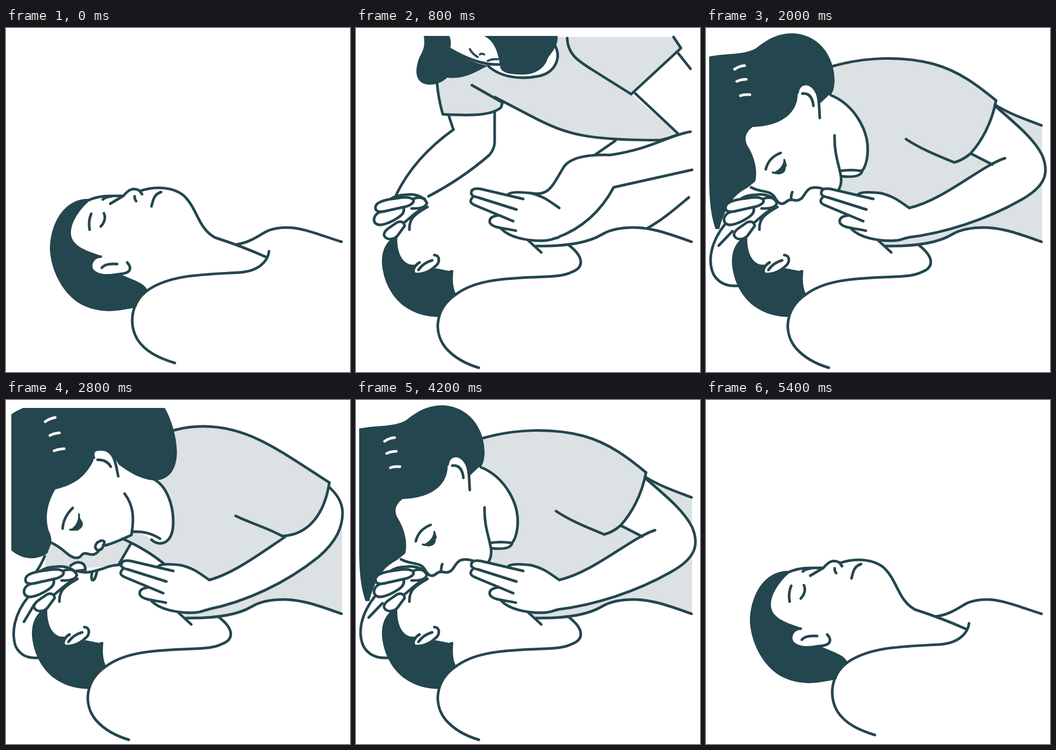
Animation, 650 px wide and 650 px high, one loop 7.2 s. Source, as an HTML page without scripts:

```html
<!DOCTYPE html>
<html lang="en">
<head>
<meta charset="utf-8">
<title>Rescue breathing</title>
<style>
html, body { margin: 0; width: 100%; height: 100%; overflow: hidden; background: #fff; }
svg { display: block; width: 100%; height: 100%; }
.line { fill: none; stroke: #24464e; stroke-width: 5; stroke-linecap: round; stroke-linejoin: round; }
.ink { fill: #24464e; stroke: none; }
.grey { fill: #dce1e3; stroke: none; }
.skin { fill: #fff; stroke: none; }
.body { fill: #fff; }
.shine { stroke: #fff; }

/* each layer is switched on and off at fixed moments of the loop */
.show { opacity: 0; animation: 7.2s step-end infinite; }
.flat { animation-name: flat; }
.approach { animation-name: approach; }
.trunk { animation-name: trunk; }
.lean { animation-name: lean; }
.reach { animation-name: reach; }
.touch { animation-name: touch; }
.pinch { animation-name: pinch; }
.settle { animation-name: settle; }
.tilted { animation-name: tilted; }
.hold { animation-name: hold; }
.watch { animation-name: watch; }
.blow { animation-name: blow; }
.open { animation-name: open; }
.closed { animation-name: closed; }
@keyframes flat { 0%, 72.222% { opacity: 1 } 8.333% { opacity: 0 } 100% { opacity: 1 } }
@keyframes approach { 0%, 5.555% { opacity: 0 } 2.777% { opacity: 1 } }
@keyframes trunk { 0%, 13.888%, 75% { opacity: 0 } 2.777%, 72.222% { opacity: 1 } }
@keyframes lean { 0%, 13.888%, 75% { opacity: 0 } 5.555%, 72.222% { opacity: 1 } }
@keyframes reach { 0%, 8.333%, 75% { opacity: 0 } 5.555%, 72.222% { opacity: 1 } }
@keyframes touch { 0%, 11.111% { opacity: 0 } 8.333% { opacity: 1 } }
@keyframes pinch { 0%, 13.888% { opacity: 0 } 11.111% { opacity: 1 } }
@keyframes settle { 0%, 13.888% { opacity: 0 } 8.333% { opacity: 1 } }
@keyframes tilted { 0%, 72.222% { opacity: 0 } 8.333% { opacity: 1 } }
@keyframes hold { 0%, 72.222% { opacity: 0 } 11.111% { opacity: 1 } }
@keyframes watch { 0%, 22.222%, 52.777%, 72.222% { opacity: 0 } 13.888%, 38.888%, 69.444% { opacity: 1 } }
@keyframes blow { 0%, 13.888%, 38.888%, 69.444% { opacity: 0 } 22.222%, 52.777% { opacity: 1 } }
@keyframes open { 0%, 27.777%, 58.333% { opacity: 0 } 22.222%, 52.777% { opacity: 1 } }
@keyframes closed { 0%, 38.888%, 69.444% { opacity: 0 } 27.777%, 58.333% { opacity: 1 } }
</style>
</head>
<body>
<svg viewBox="0 0 650 650" class="line">
<defs>
  <g id="palm">
    <path d="M147 254L118 233C108 220 122 212 130 217C140 224 143 233 153 240C172 245 186 258 186 275Q186 290 178 300M187 280L194 292M137 258L97 262C77 265 76 282 92 283L112 278Q118 272 108 271M137 256Q140 266 148 275M90 283C70 288 72 306 86 307Q94 295 110 296M77 299C66 308 68 320 82 320L103 318M72 319C58 320 56 337 70 338L95 336L116 345M135 306Q150 312 165 305"/>
  </g>
</defs>

<!-- leaning helper -->
<g class="show trunk">
  <path class="grey" d="M250 72L382 17H601L614 38L520 125L609 201L575 212C440 214 400 203 330 166L219 108Z"/>
  <path d="M219 108L330 166C400 203 440 212 575 212Q592 208 609 201M399 19C400 50 420 62 445 78L520 125L614 38L600 17M609 48L632 77M528 124L609 200"/>
  <path d="M629 320C605 340 580 362 551 378"/>
</g>
<path class="show approach" d="M219 108L382 19"/>
<g class="show lean">
  <path class="grey" d="M153 104L172 95L250 70L262 130L277 141Q275 152 268 157C235 167 200 164 164 163Z"/>
  <path d="M153 104Q156 135 164 163C200 165 255 168 274 150L277 141L219 108"/>
  <path class="skin" d="M176 15H382L376 33C388 55 378 84 345 91C315 97 275 95 250 72L178 42Z"/>
  <path class="ink" d="M128 15H176Q181 22 178 40C200 55 225 68 250 71C222 85 205 97 172 94C160 106 140 110 128 105C110 98 112 75 120 55C130 38 130 30 128 15Z"/>
  <path class="ink" d="M242 15H381C382 35 370 45 362 58C357 75 340 88 315 88C290 88 272 85 272 70C268 45 262 25 242 15Z"/>
  <path d="M178 40C215 62 245 70 272 69M250 72C275 95 315 97 345 91C378 84 388 55 376 33"/>
  <path stroke-width="4" d="M215 40Q220 49 230 55M234 50Q238 47 242 50M249 62Q258 58 268 59"/>
  <path d="M175 165L184 192"/>
</g>
<g class="show reach">
  <path d="M187 191Q168 212 153 238M210 195Q228 195 243 206M262 160V215Q262 228 252 240Q224 276 192 318"/>
  <path d="M222 317C250 265 320 225 368 189"/>
  <use href="#palm"/>
</g>
<g class="show touch">
  <path d="M187 191Q150 220 118 258M262 160V215Q262 228 252 240Q215 270 155 300"/>
  <use href="#palm" x="-38" y="30"/>
</g>
<path class="show pinch" d="M184 192Q110 245 76 315M262 160V215Q262 228 252 240Q200 285 137 318"/>

<!-- patient lying flat -->
<g class="show flat">
  <path class="skin" d="M157 325C185 314 205 318 222 317C232 305 240 301 253 308C285 297 318 302 335 316C362 340 362 378 395 396L492 433L440 462L267 496L120 460V360Z"/>
  <path class="ink" d="M160 323C110 320 83 370 83 420C86 460 105 490 120 505C140 527 170 535 197 535C215 534 230 531 246 528C250 515 258 505 268 497C262 482 245 478 220 467L200 467C175 470 160 460 161 450C161 440 170 432 181 431C160 423 138 418 127 402C112 378 140 340 160 325Z"/>
  <path d="M157 325C180 315 200 318 222 317M197 332L222 317C232 305 240 301 252 307L257 314M183 324Q188 319 200 318M253 308C285 297 318 302 335 316C362 340 362 378 395 396Q445 412 492 433M434 409C462 406 480 390 495 383C508 378 520 377 530 377C562 377 595 392 634 404"/>
  <path d="M497 422C495 440 478 460 440 462C370 466 310 466 267 496C235 520 232 560 248 588C263 612 290 624 319 633"/>
  <path d="M243 318Q243 324 246 327M293 310C280 314 278 324 275 337M161 351Q155 365 158 381M185 350C189 358 186 368 179 375"/>
  <path class="body" d="M179 432C165 432 160 444 161 452C163 464 180 469 200 467L222 464C237 461 237 452 229 443"/>
  <path d="M181 453Q188 444 210 446"/>
</g>

<!-- hand at the chin -->
<g class="show reach">
  <path class="skin" d="M365 293L393 256L480 240L489 293L462 333Q440 355 400 354L340 346L335 335L345 310Z"/>
  <path d="M451 240L490 213M632 196C590 203 560 228 480 240C440 244 410 238 393 256Q372 275 365 293M635 268L487 301"/>
  <path d="M417 266C395 288 375 295 362 299C350 302 341 312 341 322M428 292C400 310 380 318 360 320Q340 326 335 342Q345 350 365 344C400 340 415 328 437 313M443 330C425 345 400 350 372 346M384 350C410 362 440 355 462 333Q480 312 489 293"/>
</g>

<!-- helper watching the chest -->
<g class="show watch">
  <path class="grey" d="M318 57C375 42 430 52 480 76C525 98 570 130 611 156L635 215V404C555 378 510 367 465 390C440 407 400 413 340 412L298 309L235 273L214 312L75 325L73 293L85 268L220 250L280 150Z"/>
  <path class="skin" d="M280 150C302 162 316 195 316 230C316 262 303 271 290 271Q281 270 275 264Q258 250 238 249L224 177Z"/>
  <path class="skin" d="M93 169L165 100L205 95L290 152L238 249L237 255C218 264 200 272 186 275L178 284C170 292 165 294 152 290C140 288 145 300 130 298C115 295 110 280 84 269L78 230Z"/>
  <path class="skin" d="M220 262Q265 282 298 309L220 310L235 273Z"/>
  <path class="ink" d="M10 27Q20 20 32 15H300C312 35 323 70 323 100C322 135 305 152 280 152C255 150 235 138 213 122C205 110 200 98 190 94Q175 90 166 98L165 115C150 145 130 160 93 169C75 200 75 225 80 245Q88 262 85 272L78 290C50 307 25 297 10 284Z"/>
  <path class="body" d="M166 109C160 93 174 92 187 94C206 101 207 120 212 144"/>
  <path d="M173 113Q190 112 198 126M224 177C242 200 242 225 237 255C218 264 200 272 186 275M84 269C110 280 115 295 130 298C145 300 140 288 152 290C165 294 170 292 176 284M184 274C190 265 180 263 172 270Q165 278 173 284Q182 284 184 274"/>
  <path d="M238 249C260 248 275 252 291 262M280 150C302 162 316 195 316 230C316 262 303 271 290 271Q281 270 275 264M126 204Q108 222 107 243"/>
  <path class="ink" d="M137 215Q140 225 145 231C147 242 138 249 119 246Q137 237 137 215Z"/>
  <path stroke-width="3.5" d="M138 216V230M121 245H136"/>
  <path class="shine" d="M74 41Q82 35 93 33M83 67Q90 63 101 62M91 96Q98 93 110 92"/>
  <path d="M318 57C375 42 430 52 480 76C525 98 570 130 611 156M220 262Q265 282 298 309M235 273L214 309M73 295Q66 312 58 323"/>
</g>

<!-- helper giving a breath -->
<g class="show blow">
  <path class="grey" d="M240 72C300 55 370 52 430 68C480 82 515 110 548 137L546 145C575 163 605 173 635 184V404C555 378 510 367 465 390C440 407 400 413 340 412L240 310Z"/>
  <path class="skin" d="M236 127C280 145 310 195 305 240Q303 260 295 270Q293 284 255 278L200 180Z"/>
  <path d="M236 127C280 145 310 195 305 240Q303 260 295 270Q293 284 255 280M253 270Q275 267 293 270"/>
  <g class="body">
    <path class="skin" d="M88 187L173 120L213 125L243 203L254 275L251 305L222 303L197 305L165 325L145 334L85 301L74 215Z"/>
    <path class="show closed" d="M243 203C242 235 250 255 254 275Q258 292 251 305L222 303V203" stroke="none"/>
    <path class="show closed" fill="none" d="M243 203C242 235 250 255 254 275Q258 292 251 305"/>
    <path class="show open" d="M243 203C257 220 263 250 264 270Q264 292 251 305L222 303V203" stroke="none"/>
    <path class="show open" fill="none" d="M243 203C257 220 263 250 264 270Q264 292 251 305"/>
  </g>
  <path class="ink" d="M6 54C40 47 70 52 95 38C115 22 135 10 163 10C215 12 243 55 243 100C242 118 238 128 232 127L213 145C212 125 205 108 190 106Q172 108 173 122C175 150 155 185 88 187C75 197 70 210 80 225C92 245 98 270 93 290L78 302C60 312 40 325 25 380H18C8 350 6 320 6 280Z"/>
  <path class="body" d="M173 122C175 105 190 102 200 110C215 122 213 140 215 170"/>
  <path d="M182 124Q200 122 203 147M141 236Q118 245 113 267"/>
  <path class="ink" d="M147 248Q150 257 151 261C151 276 142 279 124 274Q145 267 147 248Z"/>
  <path stroke-width="3.5" d="M148 249L151 260M126 273L138 275"/>
  <path class="shine" d="M54 78Q62 72 73 71M58 101Q66 97 76 97M65 128Q72 125 83 126"/>
  <path d="M240 72C300 55 370 52 430 68C480 82 515 110 548 137M546 145C575 163 605 173 634 184"/>
</g>

<!-- patient with head tilted back -->
<g class="show tilted">
  <path class="skin" d="M78 400C80 370 100 350 135 333C150 338 160 325 165 326C185 325 200 313 222 312L325 401L340 412C400 413 440 405 465 390C480 381 500 377 525 377C560 377 595 390 634 404L640 412L403 470L188 504Z"/>
  <path class="ink" d="M65 400Q48 415 49 445C52 480 68 508 90 525C112 541 135 546 158 546C160 530 172 515 189 503C183 490 182 478 184 458Q180 456 176 459C165 457 158 455 150 454C130 466 115 467 108 460L111 447C92 450 77 430 78 397Z"/>
  <path class="body" d="M148 429C160 430 158 444 150 450C140 460 128 465 113 465C104 462 110 449 120 443"/>
  <path d="M118 457Q128 443 144 439M403 411C430 432 432 452 408 461C390 470 370 469 330 471C270 474 222 478 188 504C150 530 145 575 170 605Q192 630 232 642M325 401L350 424M101 381C100 362 108 353 135 338"/>
  <path d="M340 412C400 413 440 405 465 390C480 381 500 377 525 377C560 377 595 390 634 404"/>
</g>
<g class="show watch">
  <path class="body" d="M122 313C135 302 150 306 150 321L134 323"/>
  <path d="M134 323C152 330 170 322 185 318Q205 310 222 312M163 325C158 346 168 346 172 323"/>
  <path d="M42 372C15 405 10 440 18 465Q30 490 62 487M53 387L34 419"/>
</g>
<g class="show blow">
  <path class="skin" d="M85 301C105 312 120 305 130 320C138 335 145 334 152 328L165 325L160 300Z"/>
  <path d="M85 301C105 312 120 305 130 320C138 335 145 334 152 328Q158 323 165 325C185 330 184 309 197 303Q207 299 222 304M163 310Q160 318 161 325M60 300L45 322"/>
  <path d="M38 368C8 405 3 440 14 465Q28 490 62 487M50 384L24 411"/>
</g>

<!-- pinching hand -->
<g class="show hold body">
  <path d="M62 325Q76 315 95 315C115 312 130 321 134 331Q130 342 105 341"/>
  <path d="M62 378Q52 385 53 392C58 402 72 400 78 393L92 374Q90 363 78 367Z"/>
  <path d="M62 343L45 348C30 354 30 373 47 372Q62 370 80 358Q93 350 90 339Q84 333 62 343Z"/>
  <path d="M75 322Q40 326 37 337C35 348 45 349 60 345L96 337Q112 331 108 324Q100 317 75 322Z"/>
  <path fill="none" d="M92 367C104 358 115 345 131 338M108 323Q118 318 130 323"/>
</g>

<!-- chin hand with its forearm -->
<g class="show settle">
  <path class="skin" d="M330 312C365 318 370 300 393 262Q410 240 480 240L632 196L635 268L487 301Q450 370 380 396Z"/>
  <path d="M330 312C365 318 370 300 393 262Q410 238 480 240C560 228 590 203 632 196M451 240L490 213M635 268L487 301Q450 370 380 396"/>
</g>
<g class="show watch">
  <path class="skin" d="M384 340C430 328 480 290 527 259C575 253 602 215 611 160C625 178 635 192 636 212C636 240 625 267 590 297C530 345 455 381 380 396Z"/>
  <path d="M384 340C430 328 480 290 527 259M434 219C465 234 490 240 522 257C572 255 602 215 611 156M380 396C455 381 530 345 590 297C625 267 636 240 636 212C635 192 625 178 611 165"/>
</g>
<g class="show blow">
  <path class="skin" d="M384 340C450 325 520 265 541 258L500 237C520 215 540 180 546 147C590 185 620 210 635 240C650 275 640 300 595 325C530 362 450 388 380 396Z"/>
  <path d="M384 340C450 325 520 260 565 246M500 237L541 258M548 137C540 180 520 215 500 237Q485 250 469 254C435 240 405 228 378 210M546 147C590 185 620 210 635 240C650 275 640 300 595 325C530 362 450 388 380 396"/>
</g>
<g class="show tilted">
  <path class="skin" d="M235 304L288 314Q295 308 330 312C355 318 365 327 384 340L382 396Q370 402 350 402C320 402 290 395 270 378L253 368L270 354L225 335L217 325L218 308Z"/>
  <path d="M316 323L235 304Q216 301 218 314Q222 319 230 320L303 343M222 318C212 328 218 332 225 335L297 365M270 354Q250 356 253 368C258 378 280 378 302 383M275 380C290 395 320 402 350 402C370 402 370 398 382 396M288 314Q295 308 330 312C355 318 365 327 384 340"/>
</g>
</svg>
</body>
</html>
```
